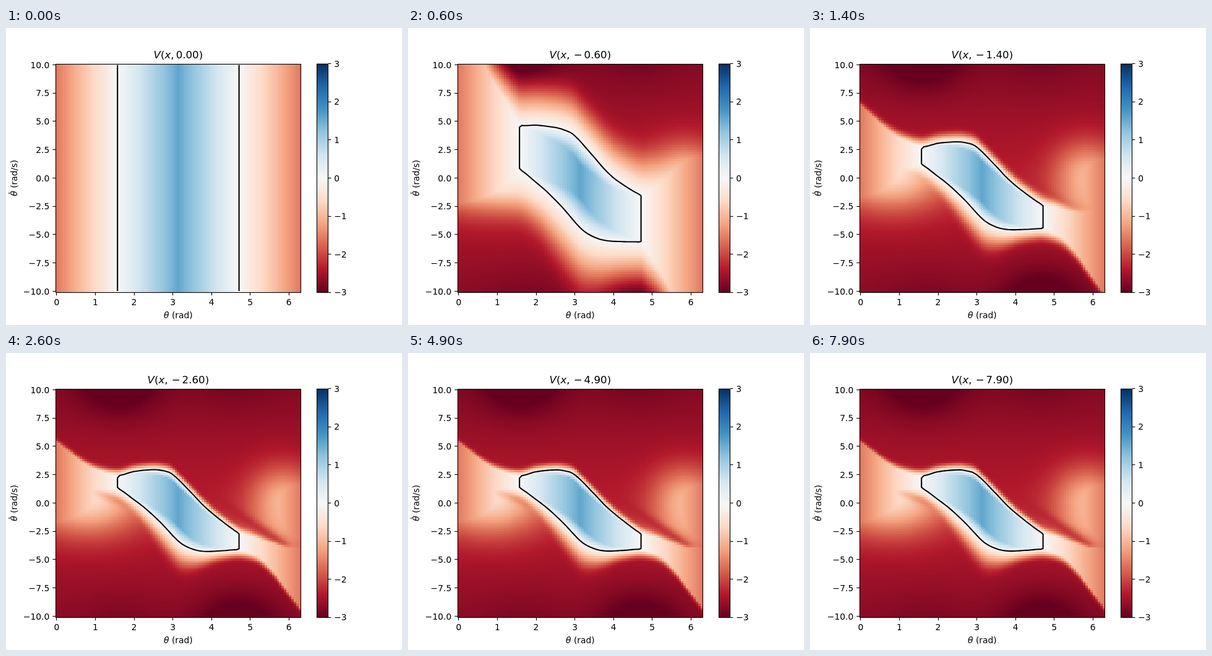
An HTML page with a canvas that plays this animation: 640 px wide and 480 px high, repeating every 8 s.

```html
<!DOCTYPE html>
<html lang="en">
<head>
<meta charset="utf-8">
<title>Value function</title>
<style>
html, body { margin: 0; width: 100%; height: 100%; overflow: hidden; background: #fff; }
canvas { display: block; }
</style>
</head>
<body>
<canvas id="stage" width="640" height="480"></canvas>
<script>
const ctx = document.getElementById('stage').getContext('2d');
const N = 101, PI = Math.PI, LO = PI / 2, HI = 3 * PI / 2;
const BOX = { x: 80, y: 57.6, w: 396.8, h: 369.6 };
const BAR = { x: 502, y: 57.6, w: 18.5, h: 369.6 };
const CELL_W = BOX.w / N, CELL_H = BOX.h / N;
const FONT = '"DejaVu Sans", Verdana, sans-serif';

const px = a => BOX.x + CELL_W / 2 + a / (2 * PI) * (BOX.w - CELL_W);
const py = v => BOX.y + BOX.h / 2 - v / 20 * (BOX.h - CELL_H);
const clamp = (v, a, b) => Math.min(b, Math.max(a, v));
const bell = (d, w) => Math.exp(-((d / w) ** 2));

// Red-white-blue scale for values -3..3
const STOPS = ['67001f', 'b2182b', 'd6604d', 'f4a582', 'fddbc7', 'f7f7f7',
  'd1e5f0', '92c5de', '4393c3', '2166ac', '053061']
  .map(s => [0, 2, 4].map(i => parseInt(s.slice(i, i + 2), 16)));
function color(v) {
  const p = clamp((v + 3) / 0.6, 0, 10), i = Math.min(9, Math.floor(p)), f = p - i;
  return STOPS[i].map((c, k) => Math.round(c + (STOPS[i + 1][k] - c) * f));
}

// Smooth curve through a few points
function curve(pts) {
  const slope = i => {
    const a = pts[Math.max(0, i - 1)], b = pts[Math.min(pts.length - 1, i + 1)];
    return (b[1] - a[1]) / (b[0] - a[0]);
  };
  return x => {
    let i = 0;
    while (i < pts.length - 2 && x > pts[i + 1][0]) i++;
    const [x0, y0] = pts[i], [x1, y1] = pts[i + 1], h = x1 - x0, u = (x - x0) / h;
    const u2 = u * u, u3 = u2 * u;
    return y0 * (2 * u3 - 3 * u2 + 1) + y1 * (3 * u2 - 2 * u3)
      + h * (slope(i) * (u3 - 2 * u2 + u) + slope(i + 1) * (u3 - u2));
  };
}
const upperEnd = curve([[0, 4.9], [0.6, 3.45], [1, 2.75], [1.57, 2.4], [2, 2.76], [2.46, 2.92],
  [2.69, 2.87], [2.98, 2.54], [3.49, 0.85], [3.81, -0.3], [4.29, -1.67], [4.72, -2.72],
  [5, -3.1], [5.5, -3.9], [6.3, -4.8]]);
const lowerEnd = curve([[0, 2], [0.8, 1.9], [1.2, 1.65], [1.57, 1.33], [2, 0.3], [2.29, -0.46],
  [2.69, -1.72], [3.17, -3.42], [3.49, -4.02], [3.81, -4.24], [4.29, -4.18], [4.72, -4.1],
  [5.2, -4.5], [5.6, -5.7], [6, -7.4], [6.3, -8.7]]);

// The safe band shrinks from the full strip towards its final shape
const settle = t => (1 - Math.tanh(t)) / 0.463;
const fade = t => Math.min(1, Math.exp(-2.9 * (t - 0.6)));
const sweep = t => Math.max(0, 1 / Math.max(t, 0.001) - 1 / 0.6);
function upper(a, t) {
  return upperEnd(a) + (0.8 + 0.55 * Math.max(0, a - 4)) * settle(t)
    + (0.15 * Math.max(0, HI - a) ** 2 + 2.2 * Math.max(0, LO - a)) * fade(t)
    + Math.max(0, HI - a) * sweep(t);
}
function lower(a, t) {
  return lowerEnd(a) - Math.max(0, 0.55 + 0.33 * (a - LO)) * settle(t)
    - 2.2 * Math.max(0, a - HI) * fade(t) - Math.max(0, a - LO) * sweep(t);
}

// Values far above the band; mirrored for below
const far = (a, y) => -2.35 - 0.04 * y
  - (0.6 * bell(a - 1.6, 1) + 0.12 * bell(a - 4.6, 1)) * bell(y - 11, 3);

function farAbove(a, y, streak) {
  const lobe = 1.35 * bell(a - 5.85, 0.85) * bell(y - 0.2, y > 0.2 ? 3 : 5);
  const dark = 0.85 * streak * bell(y + 2.9 + 2.35 * (a - 5.5), 0.6) * clamp((6.2 - a) / 0.3, 0, 1);
  return far(a, y) + lobe * (1 - dark);
}
function farBelow(a, y, streak) {
  const lobe = 1.75 * bell(a - 0.8, 1.4) * bell(y - 0.5, 3.2);
  const dark = 0.45 * streak * bell(y - 0.8 + 1.4 * (a - 1.2), 0.45) * bell(a - 1.4, 0.55);
  return far(2 * PI - a, -y) + 0.04 + lobe - dark;
}
function drop(d, w, end) {
  if (d < 0) return -d / (0.3 + 0.2 * w);
  const x = d / w;
  return end * Math.tanh(x + x ** 3);
}

const grid = document.createElement('canvas');
grid.width = grid.height = N;
const gridCtx = grid.getContext('2d');
const image = gridCtx.createImageData(N, N);

function drawField(t) {
  const spread = 27 * Math.exp(-3.1 * t);
  const streak = clamp((t - 0.9) / 1.3, 0, 1);
  const grow = Math.min(1, t / 0.4);
  for (let i = 0; i < N; i++) {
    const a = i / (N - 1) * 2 * PI, base = LO - Math.abs(a - PI);
    const top = upper(a, t), bottom = lower(a, t);
    const wTop = 0.8 + spread, wBottom = 1 + 2 * bell(a - 3, 0.8) + spread;
    for (let j = 0; j < N; j++) {
      const y = 10 - j / (N - 1) * 20;
      const v = t === 0 ? base : Math.min(base,
        drop(y - top, wTop, grow * farAbove(a, y, streak)),
        drop(bottom - y, wBottom, grow * farBelow(a, y, streak)));
      image.data.set([...color(v), 255], 4 * (j * N + i));
    }
  }
  gridCtx.putImageData(image, 0, 0);
  ctx.imageSmoothingEnabled = false;
  ctx.drawImage(grid, BOX.x, BOX.y, BOX.w, BOX.h);
}

function drawContour(t) {
  ctx.save();
  ctx.beginPath();
  ctx.rect(BOX.x, py(10), BOX.w, py(-10) - py(10));
  ctx.clip();
  ctx.beginPath();
  if (t === 0) {
    for (const a of [LO, HI]) {
      ctx.moveTo(px(a), py(10));
      ctx.lineTo(px(a), py(-10));
    }
  } else {
    const inset = 0.06, steps = 50;
    const at = k => LO + inset + (HI - LO - 2 * inset) * k / steps;
    const to = (a, y) => ctx.lineTo(px(a), py(clamp(y, -40, 40)));
    to(LO, upper(LO, t) - 0.2);
    for (let k = 0; k <= steps; k++) to(at(k), upper(at(k), t));
    to(HI, upper(HI, t) - 0.05);
    to(HI, lower(HI, t) + 0.08);
    for (let k = steps; k >= 0; k--) to(at(k), lower(at(k), t));
    to(LO, lower(LO, t) + 0.06);
    ctx.closePath();
  }
  ctx.lineWidth = 2.08;
  ctx.lineJoin = 'round';
  ctx.stroke();
  ctx.restore();
}

function label(text, x, y, align) {
  ctx.font = `13.89px ${FONT}`;
  ctx.textAlign = align;
  ctx.fillText(text, x, y);
}
// Runs of [text, italic, gap after], centred on x
function mathText(runs, x, y, size) {
  const setFont = italic => { ctx.font = `${italic ? 'italic ' : ''}${size}px ${FONT}`; };
  ctx.textAlign = 'left';
  const widths = runs.map(([text, italic, gap = 0]) => {
    setFont(italic);
    return ctx.measureText(text).width + gap;
  });
  x -= widths.reduce((a, b) => a + b) / 2;
  const start = x;
  runs.forEach(([text, italic], i) => {
    setFont(italic);
    ctx.fillText(text, x, y);
    x += widths[i];
  });
  return start;
}
function line(x0, y0, x1, y1) {
  ctx.beginPath();
  ctx.moveTo(x0, y0);
  ctx.lineTo(x1, y1);
  ctx.stroke();
}
const signed = (v, digits) => (v < 0 ? '\u2212' : '') + Math.abs(v).toFixed(digits);
const snap = v => Math.floor(v) + 0.5;

function drawFrame(t) {
  ctx.fillStyle = '#fff';
  ctx.fillRect(0, 0, 640, 480);
  drawField(t);
  ctx.strokeStyle = ctx.fillStyle = '#000';
  drawContour(t);

  const scale = ctx.createLinearGradient(0, BAR.y + BAR.h, 0, BAR.y);
  STOPS.forEach((c, i) => scale.addColorStop(i / 10, `rgb(${c})`));
  ctx.fillStyle = scale;
  ctx.fillRect(BAR.x, BAR.y, BAR.w, BAR.h);

  ctx.fillStyle = '#000';
  ctx.lineWidth = 1.11;
  for (const b of [BOX, BAR]) {
    const x = snap(b.x), y = snap(b.y + 0.5);
    ctx.strokeRect(x, y, snap(b.x + b.w) - x, snap(b.y + b.h) - y);
  }
  for (let a = 0; a <= 6; a++) {
    const x = snap(px(a));
    line(x, 427.5, x, 432.2);
    label(String(a), px(a), 447.6, 'center');
  }
  for (let v = -10; v <= 10; v += 2.5) {
    const y = snap(py(v));
    line(75.3, y, 80, y);
    label(signed(v, 1), 70.3, py(v) + 5.2, 'right');
  }
  for (let v = -3; v <= 3; v++) {
    const y = BAR.y + BAR.h * (3 - v) / 6;
    line(520.5, snap(y), 525.4, snap(y));
    label(signed(v, 0), 530.2, y + 5.2, 'left');
  }

  const time = t.toFixed(2);
  const value = t ? [['\u2212', false, 3], [time]] : [[time]];
  mathText([['V', true], ['(', false], ['x', true], [',', false, t ? 6 : 3], ...value, [')']],
    278.4, 49.3, 16.67);
  mathText([['θ', true], [' (rad)']], 278.4, 468.6, 13.89);
  ctx.save();
  ctx.translate(17.5, 242.4);
  ctx.rotate(-PI / 2);
  const start = mathText([['θ', true], [' (rad/s)']], 0, 0, 13.89);
  ctx.beginPath();
  ctx.arc(start + 4.8, -12.4, 0.95, 0, 2 * PI);
  ctx.fill();
  ctx.restore();
}

let shown = -1;
function tick() {
  const step = Math.floor(performance.now() % 8000 / 100);
  if (step !== shown) drawFrame((shown = step) / 10);
  requestAnimationFrame(tick);
}
tick();
</script>
</body>
</html>
```
